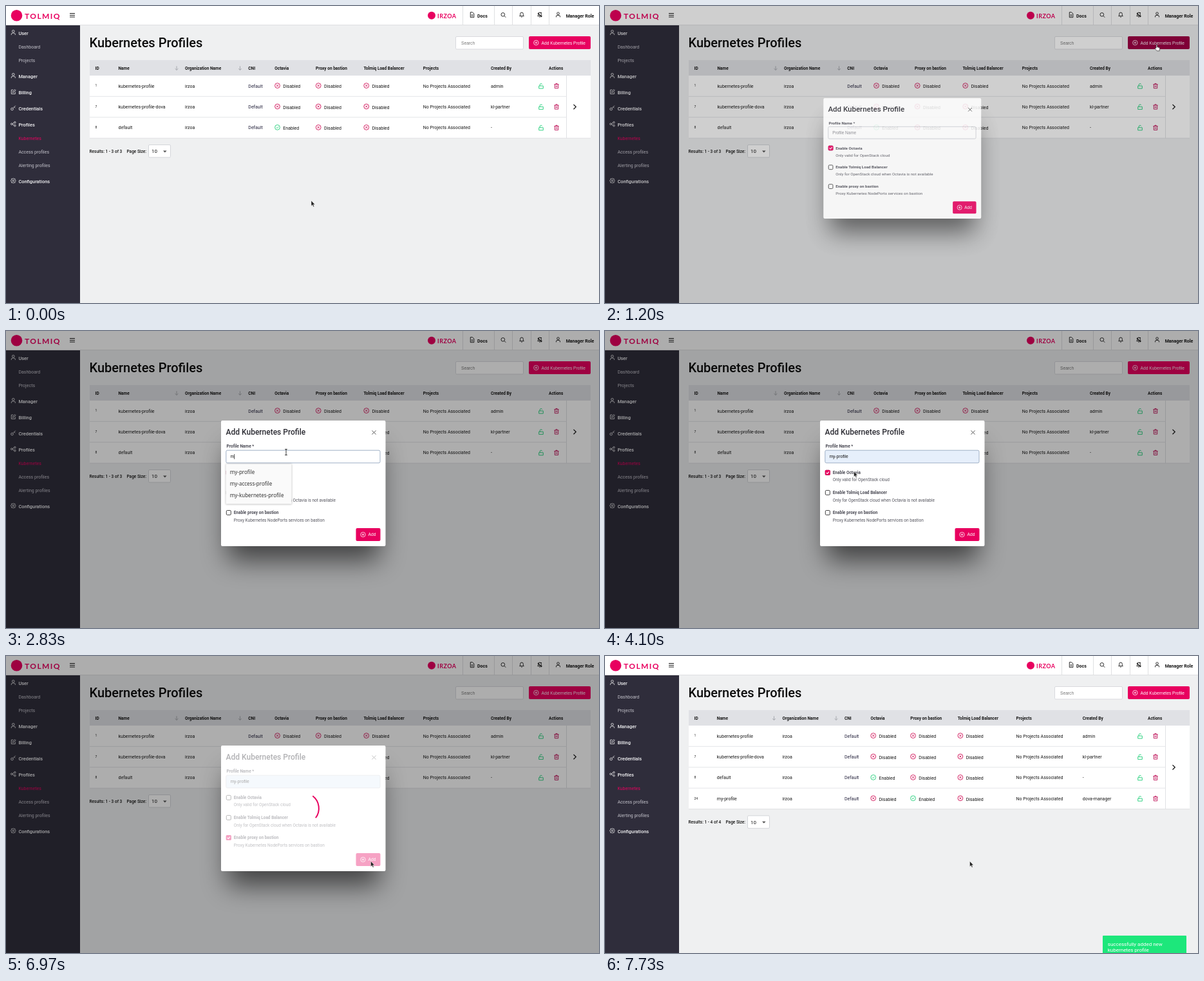
Write an HTML page that moves like this. It is 921x461 px and loops after 8000 ms.

```html
<!DOCTYPE html>
<html lang="en">
<head>
<meta charset="utf-8">
<title>Kubernetes Profiles</title>
<style>
  html, body { margin: 0; width: 100%; height: 100%; overflow: hidden; }
  svg { display: block; }
  text { white-space: pre; }
</style>
</head>
<body>
<svg id="stage" width="921" height="461" viewBox="0 0 921 461"></svg>
<script>
const PINK = '#e8005f', INK = '#161616', GREEN = '#1fcf78';
const ARIAL = 'Liberation Sans, sans-serif', ROBOTO = 'Roboto, sans-serif';
const LOOP = 8000, ROW = 32.4;

// ---------- drawing helpers ----------
const text = (x, y, s, size = 7, fill = INK, weight = 400, font = ROBOTO, extra = '') =>
  `<text x="${x}" y="${y}" font-size="${size}" fill="${fill}" font-weight="${weight}" font-family="${font}" ${extra}>${s}</text>`;
const rect = (x, y, w, h, fill, extra = '') =>
  `<rect x="${x}" y="${y}" width="${w}" height="${h}" fill="${fill}" ${extra}/>`;
const path = (d, stroke, width = 1, extra = '') =>
  `<path d="${d}" fill="none" stroke="${stroke}" stroke-width="${width}" ${extra}/>`;
const group = (id, body, extra = '') => `<g id="${id}" ${extra}>${body}</g>`;
const ring = (r, x = 0, y = 0) =>
  `M${x - r} ${y}a${r} ${r} 0 1 0 ${2 * r} 0a${r} ${r} 0 1 0 ${-2 * r} 0`;

const ICONS = {
  user: 'M-3 3.8v-1.2q0-1.7 1.7-1.7h2.6q1.7 0 1.7 1.7v1.2' + ring(1.8, 0, -2),
  edit: 'M0-3h-3v6.2h6v-3M-1 1l.3-1.5L2.6-3.6l1.2 1.2L.6.8z',
  key: 'M3.5-3.5L-.5.5M1.4-1.4l1.5 1.5' + ring(1.8, -1.8, 1.8),
  share: 'M-1.3-.5L1.3-2M-1.3.5L1.3 2' + ring(1.3, -2.5, 0) + ring(1.3, 2.5, -2.5) + ring(1.3, 2.5, 2.5),
  gear: ring(1.2) + 'M0-3.8l1 .9 1.6-.2.2 1.6 1.1 1.5-1.1 1.5-.2 1.6-1.6-.2-1 .9-1-.9-1.6.2-.2-1.6-1.1-1.5 1.1-1.5.2-1.6 1.6.2z',
  file: 'M-2.7-4h3.2l2.3 2.3v5.7h-5.5zM-1.3 0h2.6M-1.3 1.9h2.6',
  search: ring(2.8, -.5, -.5) + 'M1.5 1.5l2.4 2.4',
  bell: 'M-3.3 2h6.6l-1-1.3v-2a2.3 2.3 0 0 0-4.6 0v2zM-.8 3.6h1.6',
  lock: 'M-3.3-.3h6.6v4h-6.6zM-1.8-.3v-1.8a1.8 1.8 0 0 1 3.5-.5',
  trash: 'M-3.6-2.4h7.2M-2.7-2.4v6h5.4v-6M-1.1-2.4v-1.3h2.2v1.3M-.8-.6v2.4M.8-.6v2.4',
  cross: ring(3.9) + 'M-1.5-1.5l3 3M1.5-1.5l-3 3',
  tick: ring(3.9) + 'M-1.7 0l1.3 1.3 2.2-2.4',
  plus: ring(3.7) + 'M-1.8 0h3.6M0-1.8v3.6',
  down: 'M0-3v6M-2.5.8l2.5 2.4 2.5-2.4',
};
const icon = (name, x, y, color = INK, width = .9) =>
  path(ICONS[name], color, width, `transform="translate(${x} ${y})"`);

// ---------- page ----------
function header() {
  const dividers = [709.5, 758.5, 786.5, 815.5, 843.5].map(x => `M${x} 0v29`).join('');
  return rect(0, 0, 921, 30, '#fff') +
    path('M0 29.5H921' + dividers, '#dfe0e2', 1) +
    `<circle cx="16.5" cy="14.7" r="8.8" fill="${PINK}"/>` +
    text(29, 19.5, 'TOLMIQ', 12, PINK, 700, 'Lato, sans-serif', 'letter-spacing="1.4"') +
    path('M99 11.5h8M99 14.3h8M99 17h8', INK, 1) +
    `<circle cx="661" cy="14.7" r="6" fill="${PINK}"/>` +
    text(670, 18.6, 'IRZOA', 9, PINK, 700, 'Lato, sans-serif', 'letter-spacing=".5"') +
    icon('file', 724, 13.7) + text(732, 17.5, 'Docs', 7, INK, 700) +
    icon('search', 772.3, 13.8) + icon('bell', 801, 13.6) + icon('bell', 829, 13.6) +
    path('M826 11l6 6M829.5 10.5h2.5', INK, 1.2) +
    icon('user', 857.5, 13.6) + text(869.7, 17.5, 'Manager Role', 7, INK, 700);
}

function sidebar() {
  const sections = [['User', 42, 'user'], ['Manager', 109, 'user'], ['Billing', 134, 'edit'],
    ['Credentials', 159, 'key'], ['Profiles', 184, 'share'], ['Configurations', 272, 'gear']];
  const links = [['Dashboard', 63], ['Projects', 84], ['Kubernetes', 205],
    ['Access profiles', 226], ['Alerting profiles', 247]];
  return rect(0, 30, 115, 431, '#2f2d3b') +
    sections.map(([s, y, i]) => icon(i, 11.3, y - .8, '#eee', .8) + text(19.4, y + 2.7, s, 7.4, '#f4f4f6', 500)).join('') +
    links.map(([s, y]) => text(19.4, y + 2.5, s, 7, s == 'Kubernetes' ? PINK : '#c3c2ca')).join('');
}

function table(cols, rows) {
  const [name, sort1, org, sort2, cni, octavia, proxy, balancer, projects, by] = cols;
  const bottom = 108 + ROW * rows.length, mid = (108 + bottom) / 2;
  const heads = [[138.5, 'ID'], [name, 'Name'], [org, 'Organization Name'], [cni, 'CNI'], [octavia, 'Octavia'],
    [proxy, 'Proxy on bastion'], [balancer, 'Tolmiq Load Balancer'], [projects, 'Projects'],
    [by, 'Created By'], [843, 'Actions']];
  const status = (x, y, on) => icon(on ? 'tick' : 'cross', x + 4.2, y - .5, on ? GREEN : '#d10f56') +
    text(x + 13, y + 3.2, on ? 'Enabled' : 'Disabled');
  const row = ([id, label, flags, author], i) => {
    const y = 124.1 + ROW * i, base = y + 2.4;
    return text(138.5, y + 1.3, id, 5) + text(name, base, label) + text(org, base, 'irzoa') +
      text(cni, base, 'Default', 7, '#22203a') +
      flags.map((on, k) => status([octavia, proxy, balancer][k], y, on)).join('') +
      text(projects, base, 'No Projects Associated') + text(by, base, author) +
      icon('lock', 831, y + .2, GREEN) + icon('trash', 855, y, '#c0135a') +
      (i ? path(`M130 ${y - 16.2}H870.5`, '#e4e5e8') : '');
  };
  return rect(130, 84, 778, 24, '#e0e1e5') + rect(130, 108, 778, bottom - 108, '#fff') +
    path(`M130 ${bottom}H908M870.5 108V${bottom}`, '#e0e1e4') +
    heads.map(([x, s]) => text(x, 98.7, s, 6.5, INK, 700)).join('') +
    icon('down', sort1, 96.3, '#9a9ca3', .8) + icon('down', sort2, 96.3, '#9a9ca3', .8) +
    rows.map(row).join('') +
    path(`M881.5 ${mid - 3.7}l3.7 3.7-3.7 3.7`, INK, 1.3) +
    text(129.5, bottom + 22.7, `Results: 1 - ${rows.length} of ${rows.length}`, 6.5, INK, 500) +
    text(187.5, bottom + 22.7, 'Page Size:', 6.5, INK, 500) +
    rect(221.5, bottom + 10.3, 34, 19.5, '#fff', 'stroke="#d4d6da" rx="1.5"') +
    text(226, bottom + 23, '10', 8) +
    `<path d="M244 ${bottom + 19.2}h5.6l-2.8 3z" fill="#555"/>`;
}

const rows = [
  ['1', 'kubernetes-profile', [0, 0, 0], 'admin'],
  ['7', 'kubernetes-profile-dova', [0, 0, 0], 'kl-partner'],
  ['8', 'default', [1, 0, 0], '-'],
];
const added = ['24', 'my-profile', [0, 1, 0], 'dova-manager'];

const page = rect(0, 0, 921, 461, '#eff0f1') + header() + sidebar() +
  text(129.6, 63.6, 'Kubernetes Profiles', 20, '#0c0c0c', 500) +
  rect(698.5, 47.5, 105, 19.5, '#fff', 'stroke="#d9dade" rx="1.5"') +
  text(707, 59.6, 'Search', 6.67, '#777', 400, ARIAL) +
  rect(812, 47, 96, 20, PINK, 'rx="2" id="openButton"') +
  icon('plus', 823.3, 57, '#fff', .8) +
  text(831.5, 59.5, 'Add Kubernetes Profile', 6.67, '#fff', 400, ARIAL) +
  group('before', table([174.5, 265, 278, 363.5, 376.3, 417.3, 481, 555.5, 647.8, 753], rows)) +
  group('after', table([173.8, 262.5, 275.5, 359, 372, 412.5, 474.3, 547.7, 638.5, 741.8], [...rows, added]));

// ---------- dialog ----------
const options = [
  ['octavia', 219.8, 'Enable Octavia', 'Only valid for OpenStack cloud'],
  ['balancer', 250.9, 'Enable Tolmiq Load Balancer', 'Only for OpenStack cloud when Octavia is not available'],
  ['proxy', 282, 'Enable proxy on bastion', 'Proxy Kubernetes NodePorts services on bastion'],
];
const option = ([id, y, label, hint]) =>
  `<svg id="${id}Halo" x="341.3" y="${y - 10}" width="14" height="20"><circle cx="3.7" cy="10" r="9" fill="${PINK}" opacity=".25"/></svg>` +
  rect(342.3, y - 3.5, 7, 7, '#fff', `rx="1.4" stroke="#444" id="${id}Box"`) +
  group(id + 'Check', rect(341.8, y - 4, 8, 8, PINK, 'rx="1.5"') + path(`M343.7 ${y}l1.6 1.6 2.8-3`, '#fff', 1.1)) +
  text(353.7, y + 2.3, label, 6.5, '#4b4b55', 700) + text(353.8, y + 13.6, hint, 6.5, '#55555e');

const dialog =
  rect(344, 181, 236, 175, '#000', 'opacity=".6" style="filter:blur(20px)"') +
  rect(334, 139, 255.5, 195, '#fff', 'rx="2"') +
  group('content',
    text(341.5, 161, 'Add Kubernetes Profile', 12, '#2c2c33', 500) +
    path('M568.5 154.5l6 6M574.5 154.5l-6 6', '#444', .9) +
    text(342.5, 181.4, 'Profile Name *', 6.5, '#4b4b55', 700) +
    rect(341.8, 185.2, 239.2, 19.6, '#fff', 'rx="2" id="field"') +
    text(348.5, 197.3, '', 6.67, INK, 400, ARIAL, 'id="value"') +
    rect(0, 191, .7, 8, INK, 'id="caret"') +
    options.map(option).join('') +
    rect(543.5, 306, 38, 20, PINK, 'rx="2" id="addButton"') +
    icon('plus', 554.5, 316, '#fff', .8) + text(562.5, 318.4, 'Add', 6.67, '#fff', 400, ARIAL)) +
  group('menu',
    rect(341.5, 206.5, 102, 62.5, '#000', 'opacity=".3" style="filter:blur(1.5px)"') +
    rect(341.5, 206.5, 102, 62, '#fafafa', 'rx="1"') +
    rect(341.5, 210, 102, 18, '#e4e4e6', 'id="choice"') +
    ['my-profile', 'my-access-profile', 'my-kubernetes-profile']
      .map((s, i) => text(347.8, 221.5 + 18 * i, s, 8, '#333', 500, 'Noto Sans, sans-serif')).join('')) +
  path('M14.6-19.4A24.3 24.3 0 0 1 19.4 14.6', PINK, 2, 'id="spinner"');

const toast = rect(773, 434, 130, 40, '#1de77b', 'rx="1"') +
  text(780.8, 449.8, 'successfully added new', 8, '#fff') + text(780.8, 459, 'kubernetes profile', 8, '#fff');

const pointers =
  '<path id="arrow" d="M0 0v8.4l1.9-1.7 1.4 3.1 1.4-.6-1.4-3h2.6z" fill="#222" stroke="#fff" stroke-width=".5"/>' +
  '<path id="hand" d="M-.9 5.2V.7a.8.8 0 0 1 1.6 0V3.7l3 .7q1.1.3.9 1.6L4.2 9.7H.2L-2.6 6.3q-.3-1.1.8-1.1z" fill="#fff" stroke="#333" stroke-width=".7"/>' +
  '<path id="beam" d="M-1.8-4.5h3.6M0-4.5v9M-1.8 4.5h3.6" stroke="#222" stroke-width=".9"/>';

const stage = document.getElementById('stage');
stage.innerHTML = page + rect(0, 0, 921, 461, '#000', 'id="shade"') +
  group('dialog', dialog) + group('toast', toast) + group('pointer', pointers);
const el = {};
for (const node of stage.querySelectorAll('[id]')) el[node.id] = node;

// ---------- timing ----------
const ramp = (a, b, t) => Math.min(1, Math.max(0, (t - a) / (b - a)));
const smooth = (a, b, t) => { const p = ramp(a, b, t); return p * p * (3 - 2 * p); };
const within = (a, b, t) => t >= a && t < b;
const latest = (steps, t) => steps.filter(s => s[0] <= t).pop();

const track = [[0, 474, 302], [200, 474, 302], [1000, 857, 60], [1270, 857, 60], [1800, 435, 188],
  [2850, 435, 188], [3230, 398, 217], [3900, 397, 217], [4130, 386, 218], [4330, 379, 218], [4560, 348, 218],
  [4700, 348, 218], [5030, 360, 274], [5170, 360, 274], [5480, 361.5, 281], [5720, 361.5, 281],
  [5970, 396, 280], [6030, 396, 280], [6600, 566.5, 318.5], [LOOP, 566.5, 318.5]];
const shapes = [[0, 'arrow'], [930, 'hand'], [1310, 'arrow'], [1700, 'beam'], [3010, 'arrow'],
  [4450, 'hand'], [6170, 'arrow'], [6460, 'hand'], [6770, 'arrow'], [7330, 'hand'], [7590, 'arrow']];
const values = [[0, 'Profile Name'], [2700, 'm'], [3130, 'my-profile']];
const hovers = { octavia: [4440, 4780], balancer: [4830, 4930], proxy: [4960, 6120] };
const checks = { octavia: [0, 4620], balancer: [0, 0], proxy: [5650, LOOP] };

const set = (id, name, value) => el[id].setAttribute(name, value);
const fade = (id, value) => set(id, 'opacity', +value);

function movePointer(t) {
  const i = Math.max(1, track.findIndex(k => k[0] > t));
  const [t0, x0, y0] = track[i - 1], [t1, x1, y1] = track[i];
  const p = smooth(t0, t1, t);
  set('pointer', 'transform', `translate(${x0 + (x1 - x0) * p} ${y0 + (y1 - y0) * p})`);
  const shape = latest(shapes, t)[1];
  for (const id of ['arrow', 'hand', 'beam']) fade(id, id == shape);
}

function render(t) {
  const open = smooth(1050, 1320, t);
  const done = t >= 7720;
  fade('before', !done);
  fade('after', done);
  set('openButton', 'fill', within(930, 1300, t) ? '#9c0044' : PINK);

  fade('shade', .32 * open * (1 - smooth(7340, 7580, t)));
  fade('dialog', Math.min(1, 1.45 * open) * (1 - smooth(7330, 7490, t)));
  const scale = .9 + .1 * open;
  set('dialog', 'transform', `translate(461.7 236.5) scale(${scale}) translate(-461.7 -236.5)`);

  const loading = within(6770, 7330, t);
  fade('content', loading ? .36 : 1);
  fade('spinner', loading);
  set('spinner', 'transform', `translate(461.6 236.5) rotate(${(t - 6970) * .45})`);

  set('field', 'fill', t < 3130 ? '#fff' : '#e6effb');
  set('field', 'stroke', within(2470, 4620, t) ? '#9fb0c6' : '#cfd2d8');
  el.value.textContent = latest(values, t)[1];
  set('value', 'fill', t < 2700 ? '#85858c' : INK);
  set('caret', 'x', t < 2700 ? 348.5 : t < 3130 ? 354.4 : 379.2);
  fade('caret', within(2470, 3130, t) || within(3560, 4030, t));
  fade('menu', ramp(2760, 2800, t) * (1 - ramp(3500, 3680, t)));
  fade('choice', t >= 3130);

  for (const [id, [a, b]] of Object.entries(hovers)) {
    fade(id + 'Halo', smooth(a, a + 120, t) - smooth(b, b + 120, t));
    set(id + 'Box', 'stroke', within(a, b, t) ? PINK : '#444');
    fade(id + 'Check', within(...checks[id], t));
  }
  set('addButton', 'fill', within(6460, 6770, t) || t >= 7330 ? '#b8004e' : PINK);
  fade('toast', smooth(7300, 7400, t));
  movePointer(t);
}

function tick() {
  render(performance.now() % LOOP);
  requestAnimationFrame(tick);
}
tick();
</script>
</body>
</html>
```
